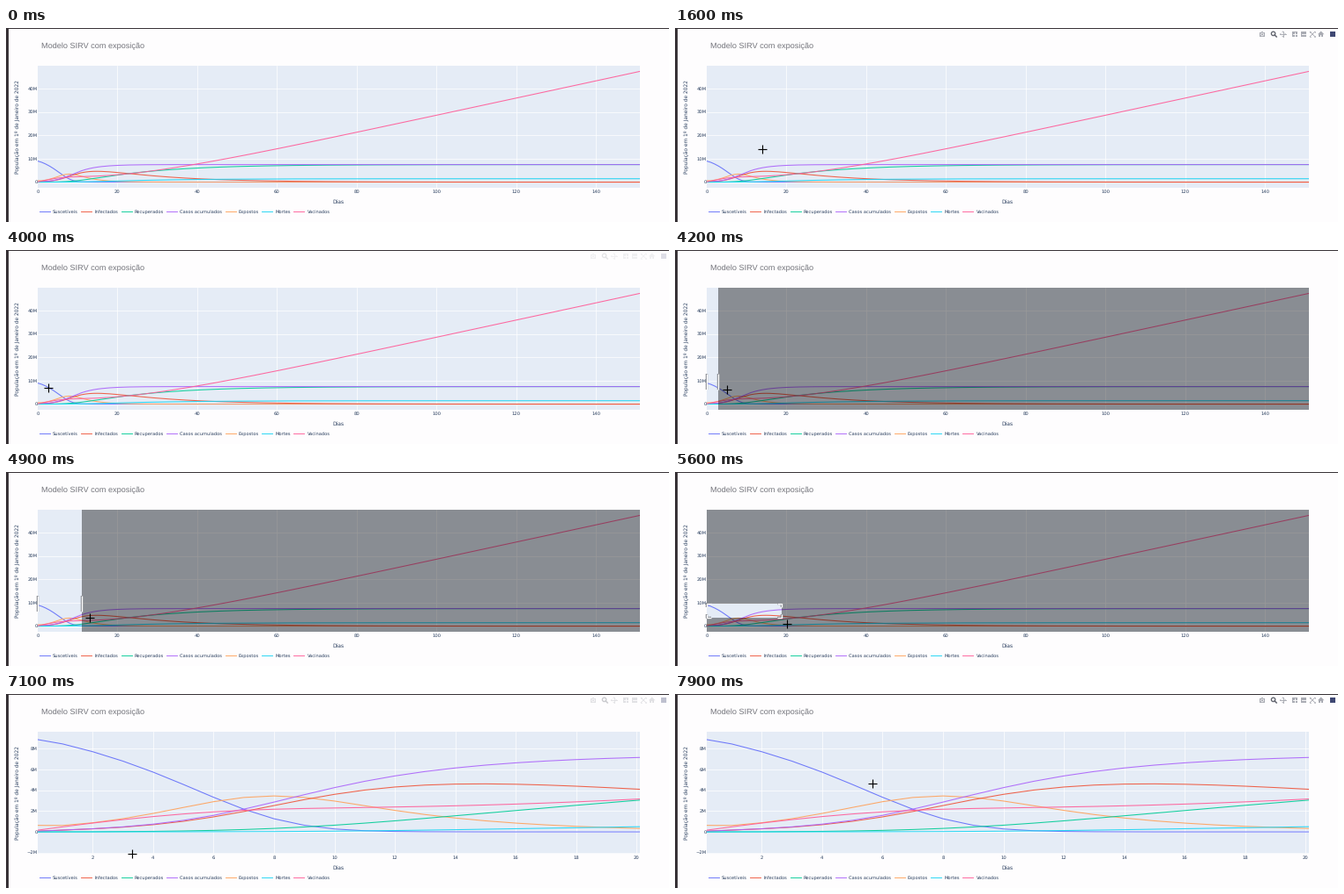
Recreate the animation shown at these times as a matplotlib script. Size 752x221 px, loop 8 s.

```python
import numpy as np
import matplotlib.pyplot as plt
from matplotlib.animation import FuncAnimation
from matplotlib.patches import Circle, PathPatch, Polygon, Rectangle
from matplotlib.path import Path

plt.rcParams["text.hinting"] = "none"

W, H, DPI = 752, 221, 64
FRAMES, STEP = 80, 100
PT = 72 / DPI
L, T, R, B = 36, 43, 718.5, 182
PAGE, PANEL, INK = "#fefdfe", "#e5ecf6", "#2a3f5f"

COLORS = {
    "Suscetíveis": "#636efa", "Infectados": "#ef553b",
    "Recuperados": "#00cc96", "Casos acumulados": "#ab63fa",
    "Expostos": "#ffa15a", "Mortes": "#19d3f3", "Vacinados": "#ff5c98"}

# time in s, pointer x, pointer y
POINTER = np.array([
    (.8, 215, 48), (1.6, 99, 138), (2.3, 60, 149.5), (3.2, 61, 155),
    (3.4, 43, 156), (3.8, 44, 156), (4, 48, 156.5), (4.2, 58.5, 158.5),
    (5.5, 127, 172.5), (6.3, 128, 179), (6.8, 133, 187.5), (7, 134, 187),
    (7.8, 204, 144), (7.9, 224, 102)])
ENTER, DRAG, RELEASE = .8, 4.1, 7.0
ANCHOR = 149.5

fig = plt.figure(figsize=(W / DPI, H / DPI), dpi=DPI, facecolor=PAGE)
ax = fig.add_axes([0, 0, 1, 1])
ax.set(xlim=(0, W), ylim=(H, 0))
ax.axis("off")


def label(x, y, s, size, ha="left", color=INK, **kw):
    return ax.text(x, y, s, fontsize=size * PT, ha=ha, color=color,
                   **{"va": "center_baseline", "family": "DejaVu Sans", **kw})


def line(x, y, color, width, z=2, **kw):
    return ax.plot(x, y, color=color, lw=width * PT, zorder=z, **kw)[0]


def box(x0, y0, x1, y1, color, z=1):
    return ax.add_patch(Rectangle((x0, y0), x1 - x0, y1 - y0, fc=color, lw=0, zorder=z))


def simulate(days=152):
    """Daily SIRV model with exposure, in millions of people."""
    beta, sigma, gamma = .268, .205, .055
    s, e, i, r, m, v = 8.98, .63, .05, 0, 0, .1
    rows = []
    for _ in range(days):
        rows.append((s, e, i, r, i + r, m, v))
        caught = beta * s * i / (1 + .2 * i)
        sick, healed, shots = sigma * e, gamma * i, .043 * s
        m += .5 * (.195 * r - m)
        v += shots + .049 * r
        s, e = s - caught - shots, e + caught - sick
        i, r = i + sick - healed, r + healed
    names = ("Suscetíveis", "Expostos", "Infectados", "Recuperados",
             "Casos acumulados", "Mortes", "Vacinados")
    return dict(zip(names, np.array(rows).T))


def build_view(x0, kx, y0, ky, xticks, yticks):
    """Grid, tick labels and curves; (x0, y0) is the pixel of the zero point."""
    parts = []
    for n in xticks:
        x = x0 + n * kx
        if x > L + 1:
            parts.append(line([x, x], [T, B], "white", .7))
        parts.append(label(x, 186.3, str(n), 5.2, "center"))
    for n in yticks:
        y = y0 - n * ky
        parts.append(line([L, R], [y, y], "white", .7 if n else 1.1))
        text = f"{n}M".replace("-", "\u2212") if n else "0"
        parts.append(label(35.7, y - .2, text, 5.2, "right"))
    for name, v in model.items():
        curve = line(x0 + np.arange(len(v)) * kx, y0 - v * ky,
                     COLORS[name], 1.05, 3, alpha=.92)
        curve.set_clip_path(panel)
        parts.append(curve)
    return parts


def build_legend(x, y):
    for name, color in COLORS.items():
        line([x, x + 12], [y, y], color, .9)
        text = label(x + 15, y, name, 5.07)
        x += 18.5 + text.get_window_extent().width


def build_modebar(y=7):
    g, dark = "#a9abb3", "#62656f"
    box(662.8, 4.8, 669.4, 9.8, g, 5)
    box(664.8, 3.8, 667.4, 5, g, 5)
    ax.add_patch(Circle((666.1, 7.3), 1.5, fc=g, ec=PAGE, lw=.8, zorder=6))
    ax.add_patch(Circle((678.6, 6.4), 2.2, fc="none", ec=dark, lw=1.5, zorder=5))
    line([680.2, 682.2], [8, 10], dark, 1.5, 5)
    line([686.2, 692.8], [y, y], g, .9, 5)
    line([689.5, 689.5], [y - 3.3, y + 3.3], g, .9, 5)
    for d in ((1, 0), (-1, 0), (0, 1), (0, -1)):
        d = np.array(d)
        tip, side = (689.5, y) + 3.6 * d, 1.3 * d[::-1]
        ax.add_patch(Polygon([tip, tip - 1.4 * d + side, tip - 1.4 * d - side],
                             fc=g, lw=0, zorder=5))
    for x in (703, 713):
        box(x - 3, y - 3, x + 3, y + 3, g, 5)
        line([x - 1.7, x + 1.7], [y, y], PAGE, .9, 6)
    line([703, 703], [y - 1.7, y + 1.7], PAGE, .9, 6)
    for s in (1, -1):
        line([720.2, 725.8], [y - 2.8 * s, y + 2.8 * s], g, .8, 5)
        for k in (1, -1):
            cx, cy = 723 + 3.1 * s, y + 3.1 * k
            line([cx - 1.5 * s, cx, cx], [cy, cy, cy - 1.5 * k], g, .7, 5)
    ax.add_patch(Polygon([(729, 7.2), (732.7, 3.5), (736.4, 7.2)], fc=g, lw=0, zorder=5))
    box(730.2, 7, 735.2, 10.2, g, 5)
    box(732.1, 8, 733.3, 10.2, PAGE, 6)
    box(742.6, 3.6, 749.4, 10.4, "#3f4873", 5)


box(0, 0, 2.6, H, "#383337")
box(0, 0, W, 1.2, "#383337")
panel = box(L, T, R, B, PANEL)
label(40, 22.6, "Modelo SIRV com exposição", 9.17, color="#74757c",
      family="Liberation Sans", va="baseline")
label(377.3, 197.6, "Dias", 6, "center")
label(13, 112.7, "População em 1º de Janeiro de 2022", 5.94, "center",
      rotation=90, va="center")
build_legend(38, 209.3)

model = simulate()
wide = build_view(36, 4.521, 175.6, 2.669, range(0, 141, 20), range(0, 41, 10))
near = build_view(29.8, 34.27, 157.1, 11.83, range(2, 21, 2), range(-2, 9, 2))

build_modebar()
veil = box(655, 2, W, 12.5, PAGE, 8)

shade = ax.add_patch(PathPatch(Path([(0, 0)]), fc="black", alpha=.4, lw=0, zorder=10))
handles = [line([], [], c, w, 11, solid_capstyle="butt")
           for c, w in (("#80838a", 2.4), ("white", 1.4))]
cross = [line([], [], "black", 1.15, 12, solid_capstyle="butt") for _ in range(2)]


def pointer(t):
    return [np.interp(t, POINTER[:, 0], POINTER[:, k]) for k in (1, 2)]


def rect_path(x0, y0, x1, y1):
    return [(x0, y0), (x1, y0), (x1, y1), (x0, y1), (x0, y0)]


def select(t):
    """Darken all but the dragged area: a full-height band, then a box."""
    px, py = pointer(t - .05)
    x, y = px - 6.5, min(py - 6.5, B)
    gap = (np.nan, np.nan)
    if y - ANCHOR < 10:
        top, low = T, B
        marks = [(L, 141), (L, 159), gap, (x, 141), (x, 159)]
    else:
        top, low = ANCHOR, y
        n = min(4.5, (low - top) / 3)
        marks = []
        for cx, sx in ((L, 1), (x, -1)):
            for cy, sy in ((top, 1), (low, -1)):
                marks += [(cx + n * sx, cy), (cx, cy), (cx, cy + n * sy), gap]
    outer, hole = rect_path(L, T, R, B), rect_path(L, top, x, low)[::-1]
    codes = [Path.MOVETO] + [Path.LINETO] * 3 + [Path.CLOSEPOLY]
    shade.set_path(Path(outer + hole, codes * 2))
    for h in handles:
        h.set_data(*zip(*marks))


def draw(i):
    t = i * STEP / 1000
    zoomed = t >= RELEASE
    for part in wide:
        part.set_visible(not zoomed)
    for part in near:
        part.set_visible(zoomed)

    dragging = DRAG <= t < RELEASE
    for part in (shade, *handles):
        part.set_visible(dragging)
    if dragging:
        select(t)

    veil.set_alpha(np.interp(t, [.5, .9, 3.75, 4.05, 7, 7.3], [1, 0, 0, 1, 1, 0]))

    x, y = pointer(t)
    cross[0].set_data([x - 5, x + 5], [y, y])
    cross[1].set_data([x, x], [y - 5, y + 5])
    for c in cross:
        c.set_visible(t >= ENTER)
    return []


anim = FuncAnimation(fig, draw, frames=FRAMES, interval=STEP,
                     repeat=True, repeat_delay=0, blit=False)
plt.show()
```
